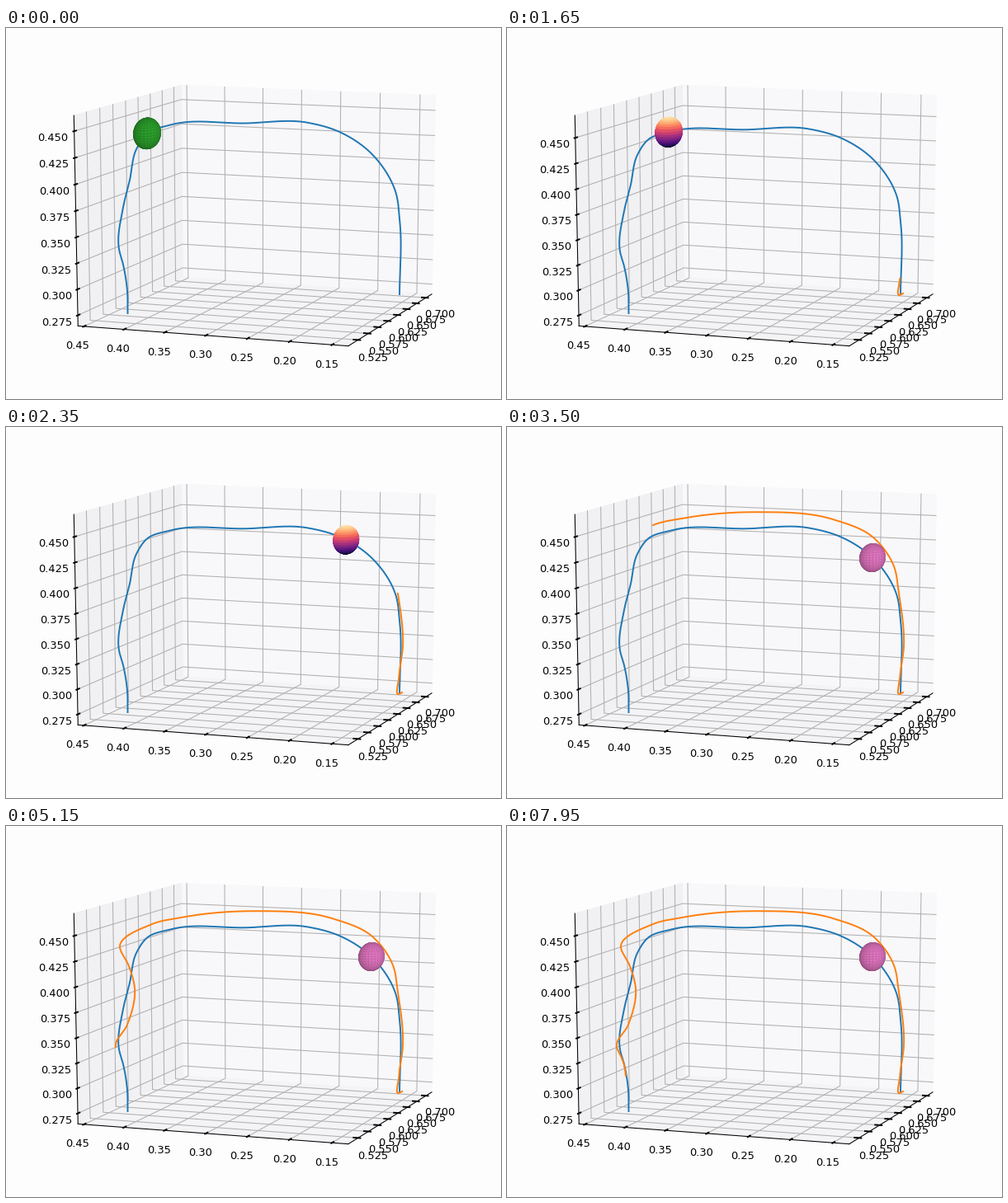
A matplotlib script that plays this animation: 600x450 px, repeating every 8 s.

```python
import numpy as np
import matplotlib.pyplot as plt
from matplotlib.animation import FuncAnimation
from matplotlib.collections import LineCollection, PolyCollection

W, H, STEP, FRAMES = 600, 450, 50, 160
EL, AZ, DIST = np.radians(12), np.radians(200), 10

# camera basis: towards the eye, right, up
EYE = np.array([np.cos(AZ) * np.cos(EL), np.sin(AZ) * np.cos(EL), np.sin(EL)])
RIGHT = np.array([-np.sin(AZ), np.cos(AZ), 0])
UP = np.cross(EYE, RIGHT)
SCALE = np.array([W, H]) / 0.185
ORIGIN = np.array([W * 0.095, H * 0.09]) / 0.185

X_LIM, Y_LIM = (0.5063, 0.7118), (0.1376, 0.4508)
Z_LIMS = ((0.2687, 0.4606), (0.2685, 0.4674))
Z_GROW = np.ptp(Z_LIMS[1]) / np.ptp(Z_LIMS[0])
EDGE = 0.5 + 1 / 48
LABEL = EDGE + 0.057
BACK = np.array([1, 1, -1]) * EDGE
SPINES = np.array([(1, -1, -1), (-1, 1, -1), (-1, 1, 1)])
PANES = ("#f8f7f9", "#f1f0f3", "#f4f3f5")
RADIUS = 0.0146
MOVE_START, MOVE_TIME = 1300, 1450

BLUE = [(477, 323), (477.5, 240), (472, 202.5), (443, 158.5), (405, 133.5),
        (365, 122.3), (290, 123.3), (200, 125.3), (171, 135.5), (158, 154),
        (150, 190), (142, 222), (137, 271), (142, 289), (147, 320),
        (147.5, 346)]
BALL_FROM, BALL_TO = 8, 3
ORANGE = [(480, 322), (476, 324), (476.3, 304), (481, 266), (475, 202),
          (469, 169), (444, 134), (395, 112), (303, 103.2), (215, 110.5),
          (177, 119), (138, 146), (149, 170), (156, 197), (147, 241),
          (133, 268), (138, 279), (142, 290), (144, 303)]
# time in ms -> knot reached
ORANGE_KEYS = {50: 0, 950: 1, 1650: 2, 2350: 4, 3500: 10, 5150: 15, 7950: 18}


def hermite(x, xk, yk, m):
    i = np.clip(np.searchsorted(xk, x, "right") - 1, 0, len(xk) - 2)
    h = xk[i + 1] - xk[i]
    s = (x - xk[i]) / h
    if yk.ndim > 1:
        s, h = s[:, None], h[:, None]
    return ((1 + 2 * s) * (1 - s) ** 2 * yk[i] + s * (1 - s) ** 2 * h * m[i]
            + s * s * (3 - 2 * s) * yk[i + 1] + s * s * (s - 1) * h * m[i + 1])


class Curve:
    """Smooth curve through a few points, by length."""

    def __init__(self, points):
        self.p = np.array(points, float)
        self.s = np.r_[0, np.cumsum(np.hypot(*np.diff(self.p, axis=0).T))]
        self.m = np.gradient(self.p, self.s, axis=0)

    def at(self, s):
        return hermite(np.atleast_1d(s), self.s, self.p, self.m)

    def until(self, s):
        return self.at(np.linspace(0, s, 600))


def monotone(keys, values):
    """Easing that never runs backwards between keyed values."""
    d = np.diff(values) / np.diff(keys)
    m = np.r_[0, 2 * d[1:] * d[:-1] / (d[1:] + d[:-1]), 0]
    return lambda t: hermite(np.clip(t, keys[0], keys[-1]), keys, values, m)


def ease(s):
    s = np.clip(s, 0, 1)
    return s ** 3 * (10 - 15 * s + 6 * s * s)


def project(p):
    p = np.asarray(p, float)
    depth = DIST - p @ EYE
    x = ORIGIN[0] + SCALE[0] * (p @ RIGHT) / depth
    y = ORIGIN[1] - SCALE[1] * (p @ UP) / depth
    return np.stack([x, y], -1)


def stretch(p):
    """Screen points under the tighter height limits of the opening."""
    floor = np.interp(p[:, 0], [147, 477], [346, 324])
    return np.c_[p[:, 0], floor - Z_GROW * (floor - p[:, 1])]


def put(p, axis, value):
    q = np.array(p, float)
    q[axis] = value
    return q


fig = plt.figure(figsize=(6.4, 4.8), dpi=93.75, facecolor="#fefdfe")
ax = fig.add_axes([0, 0, 1, 1])
ax.set_xlim(0, W)
ax.set_ylim(H, 0)
ax.axis("off")


def lines(paths, color, width, z):
    return ax.add_collection(LineCollection(
        [project(p) for p in paths], colors=color, linewidths=width,
        capstyle="projecting", zorder=z))


def draw_axis(k, start, step, count, lim, digits):
    """Grid, ticks and labels of one axis; returns the artists."""
    a, b = [j for j in range(3) if j != k]
    side = 1 if k == 0 else 0
    grid, ticks, texts = [], [], []
    for value in start + step * np.arange(count):
        t = (value - lim[0]) / (lim[1] - lim[0]) - 0.5
        wall = put(BACK, k, t)
        grid.append([put(wall, a, -wall[a]), wall, put(wall, b, -wall[b])])
        foot = put(SPINES[k] * EDGE, k, t)
        ticks.append([put(foot, side, -EDGE - 0.1 / 12),
                      put(foot, side, -EDGE + 0.2 / 12)])
        spot = project(put(SPINES[k] * LABEL, k, t))
        texts.append(ax.text(*spot, f"{value:.{digits}f}", fontsize=10,
                             family="DejaVu Sans", ha="center", va="top"))
    return [lines(grid, "#b0b0b0", 0.8, 1), lines(ticks, "black", 1.5, 2),
            *texts]


for k, color in enumerate(PANES):
    a, b = [j for j in range(3) if j != k]
    quad = [put(put(BACK, a, i * EDGE), b, j * EDGE)
            for i, j in ((-1, -1), (1, -1), (1, 1), (-1, 1))]
    ax.add_patch(plt.Polygon(project(quad), facecolor=color, edgecolor=color,
                             lw=0.8, zorder=0))
    spine = SPINES[k] * EDGE
    lines([[put(spine, k, -EDGE), put(spine, k, EDGE)]], "black", 0.8, 2)

draw_axis(0, 0.525, 0.025, 8, X_LIM, 3)
draw_axis(1, 0.15, 0.05, 7, Y_LIM, 2)
z_axes = [draw_axis(2, 0.275, 0.025, 8, lim, 3) for lim in Z_LIMS]

blue, orange = Curve(BLUE), Curve(ORANGE)
orange_reach = monotone(np.array(list(ORANGE_KEYS), float),
                        orange.s[list(ORANGE_KEYS.values())])
blue_points = blue.until(blue.s[-1])
blue_line, = ax.plot([], [], color="tab:blue", lw=1.5, zorder=3)
orange_line, = ax.plot([], [], color="tab:orange", lw=1.5, zorder=4)

# unit sphere as quads
lon, lat = np.meshgrid(np.linspace(0, 2 * np.pi, 25), np.linspace(0, np.pi, 19))
ball = np.stack([np.cos(lon) * np.sin(lat), np.sin(lon) * np.sin(lat),
                 np.cos(lat)], -1)
quads = np.stack([ball[:-1, :-1], ball[:-1, 1:], ball[1:, 1:], ball[1:, :-1]],
                 2).reshape(-1, 4, 3)
middle = quads.mean(1)
light = np.array([-1, -1, 0.5]) / 1.5
shade = (0.75 + 0.25 * middle @ light)[:, None]
GREEN = shade * plt.cm.tab10(2)[:3]
PINK = shade * plt.cm.tab10(6)[:3]
MAGMA = plt.cm.magma(0.5 + 0.45 * middle[:, 2])[:, :3]
sphere = ax.add_collection(PolyCollection([], linewidths=0.4, zorder=5))


def place_ball(center, z_lim, colors, edge):
    span = np.array([np.ptp(X_LIM), np.ptp(Y_LIM), np.ptp(z_lim)])
    off = RADIUS * quads / span
    near = np.interp(center[0], [171, 443], [1.03, 0.965])
    flat = np.stack([off @ RIGHT, -(off @ UP)], -1) * SCALE / DIST * near
    order = np.argsort((off @ EYE).mean(1))
    sphere.set_verts((center + flat)[order])
    sphere.set_facecolor(colors[order])
    sphere.set_edgecolor(colors[order] * edge)


def update(i):
    t = i * STEP
    moved = t > MOVE_START
    for k, artists in enumerate(z_axes):
        for artist in artists:
            artist.set_visible(k == moved)
    fit = (lambda p: p) if moved else stretch

    reach = orange_reach(t)
    blue_line.set_data(*fit(blue_points).T)
    orange_line.set_data(*fit(orange.until(reach)).T)
    orange_line.set_visible(reach > 0)

    go = ease((t - MOVE_START) / MOVE_TIME)
    first, last = blue.s[BALL_FROM], blue.s[BALL_TO]
    center = fit(blue.at(first + (last - first) * go))[0]
    if not moved:
        colors, edge = GREEN, 0.88
    elif go < 1:
        colors, edge = MAGMA, 1
    else:
        colors, edge = PINK, 0.88
    place_ball(center, Z_LIMS[int(moved)], colors, edge)
    return blue_line, orange_line, sphere


anim = FuncAnimation(fig, update, frames=FRAMES, interval=STEP,
                     repeat=True, repeat_delay=0, blit=False)
plt.show()
```
